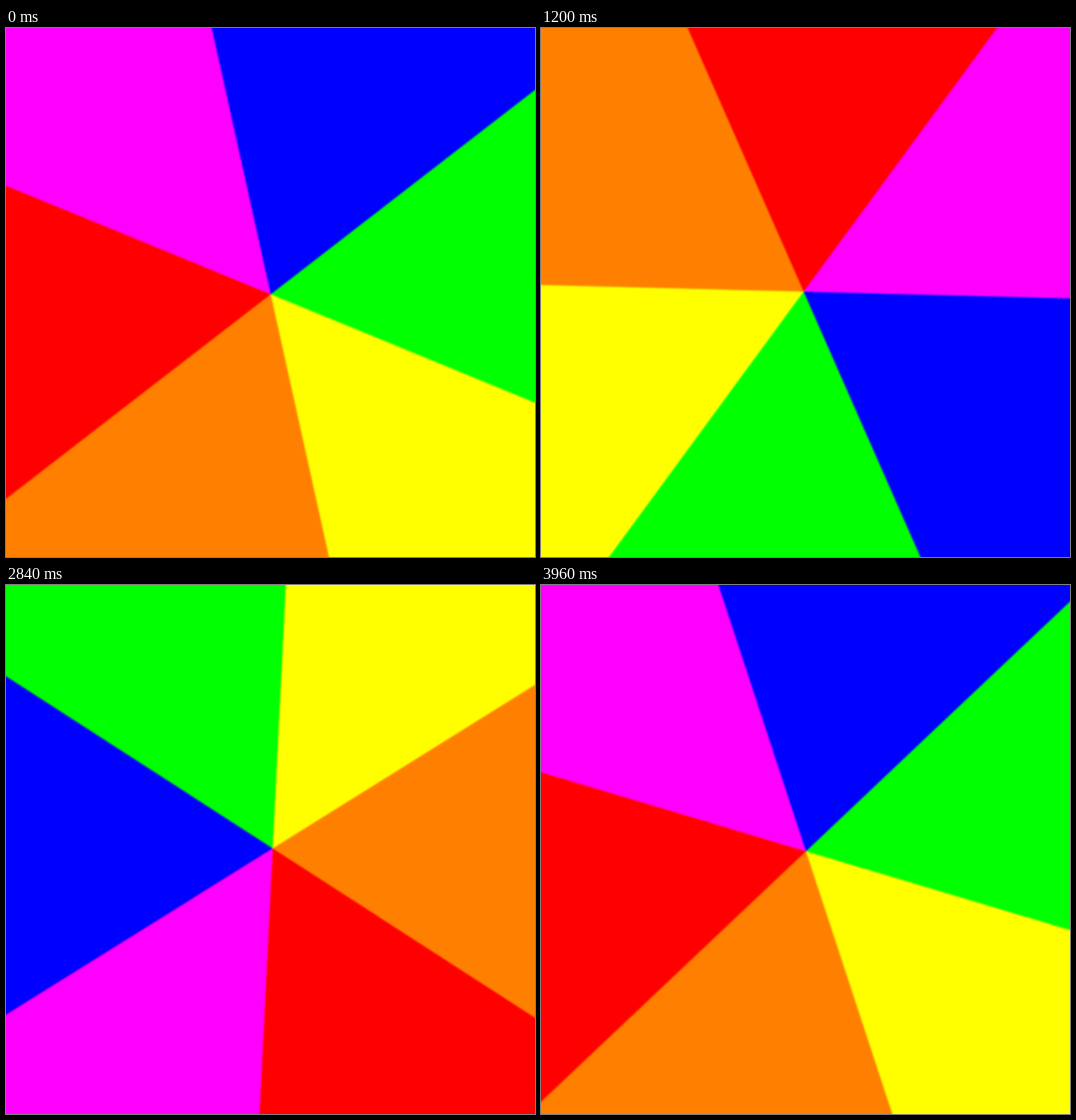
Write an HTML page that moves like this. It is 720 px wide and 720 px high and loops after 4000 ms.

```html
<!DOCTYPE html>
<html lang="en">
<head>
<meta charset="utf-8">
<title>Colour wheel</title>
<style>
  html, body { margin: 0; width: 100%; height: 100%; overflow: hidden; }
  svg { display: block; width: 100%; height: 100%; }
</style>
</head>
<body>
<svg viewBox="0 0 720 720">
  <filter id="soft" filterUnits="userSpaceOnUse" x="-20" y="-20" width="760" height="760"
    color-interpolation-filters="sRGB"><feGaussianBlur stdDeviation="0.8"/></filter>
  <g filter="url(#soft)"><g id="wheel"></g></g>
</svg>
<script>
const LOOP = 4000, STEP = 40;
const sectors = [
  ['#0000ff', 64.8], ['#00ff00', 60], ['#ffff00', 55.2],
  ['#ff8000', 64.8], ['#ff0000', 60], ['#ff00ff', 55.2]
];
// Time in ms and wheel angle in degrees; the spin is slightly uneven.
const spin = [
  [0, -12.5], [760, 52.5], [1200, 91.45], [1800, 143.45],
  [2440, 201], [3240, 275.1], [3960, 341.8], [4000, 345.5]
];
const wheel = document.getElementById('wheel');

function point(deg) {
  const a = deg * Math.PI / 180;
  return (1200 * Math.sin(a)).toFixed(2) + ',' + (-1200 * Math.cos(a)).toFixed(2);
}

// Neighbours overlap a little so that no seam shows between them.
let start = 0;
sectors.forEach(([color, size], i) => {
  const from = i === 0 ? -10 : start;
  const to = start + size + (i < sectors.length - 1 ? 10 : 0);
  const wedge = document.createElementNS('http://www.w3.org/2000/svg', 'polygon');
  wedge.setAttribute('points', ['0,0', point(from), point((from + to) / 2), point(to)].join(' '));
  wedge.setAttribute('fill', color);
  wheel.appendChild(wedge);
  start += size;
});

function angleAt(t) {
  const i = spin.findIndex(([time]) => time > t);
  const [t0, a0] = spin[i - 1], [t1, a1] = spin[i];
  return a0 + (a1 - a0) * (t - t0) / (t1 - t0);
}

function draw(ms) {
  const t = Math.floor((ms % LOOP) / STEP) * STEP;
  // The hub sits slightly off the pivot.
  wheel.setAttribute('transform',
    `translate(360.3 359.5) rotate(${angleAt(t).toFixed(3)}) translate(-0.6 2.84)`);
}

const begin = performance.now();
function tick() {
  draw(performance.now() - begin);
  requestAnimationFrame(tick);
}
tick();
</script>
</body>
</html>
```
